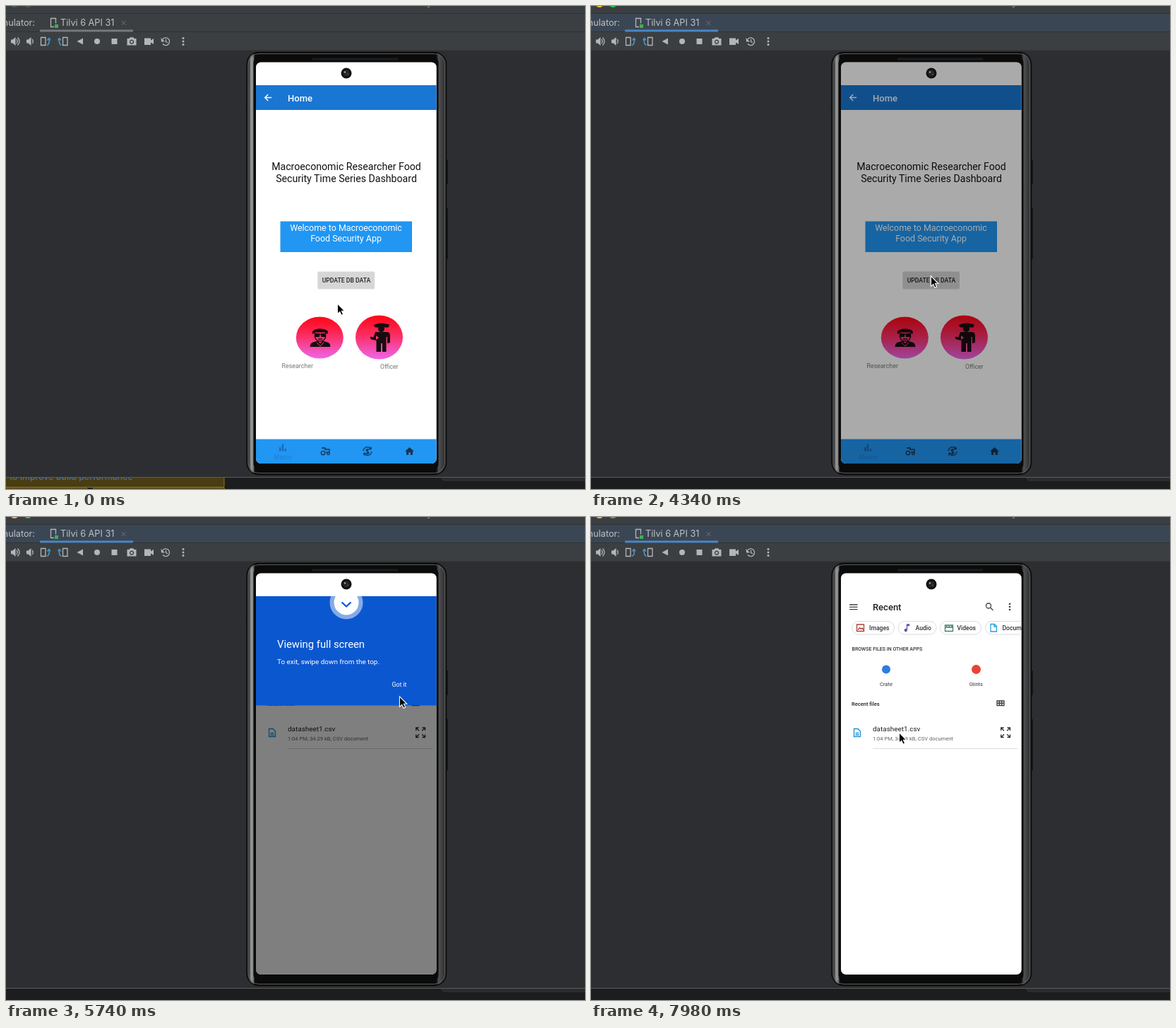
An HTML page for the animation above (8000 ms loop, 820x683 px).

```html
<!DOCTYPE html>
<html lang="en">
<head>
<meta charset="utf-8">
<title>Emulator</title>
<style>
html, body { margin: 0; width: 100%; height: 100%; overflow: hidden; background: #2d2e31; }
svg { display: block; width: 100vw; height: 100vh; }
text { font-family: Roboto, sans-serif; }
.ide text { font-family: Inter, sans-serif; font-size: 12.7px; fill: #bfc1c3; }
.m { font-weight: 500; }
.mid { text-anchor: middle; }
.line { fill: none; stroke: currentColor; stroke-width: 1.3; }
</style>
</head>
<body>
<svg viewBox="0 0 820 683">
<defs>
  <linearGradient id="pink" x2="0" y2="1">
    <stop offset=".05" stop-color="#ff0a1c"/><stop offset=".45" stop-color="#fb2d62"/><stop offset="1" stop-color="#ee66ea"/>
  </linearGradient>
  <linearGradient id="metal">
    <stop stop-color="#232425"/><stop offset=".012" stop-color="#3a3b3c"/><stop offset=".022" stop-color="#9a9b9b"/>
    <stop offset=".032" stop-color="#808181"/><stop offset=".04" stop-color="#0c0c0c"/><stop offset=".95" stop-color="#0c0c0c"/>
    <stop offset=".962" stop-color="#505152"/><stop offset=".98" stop-color="#3b3c3d"/><stop offset="1" stop-color="#29292a"/>
  </linearGradient>
  <clipPath id="glass"><rect x="354" y="79.500" width="255.700" height="567.500" rx="7"/></clipPath>
  <clipPath id="below"><rect x="354" y="112" width="256" height="535"/></clipPath>
</defs>

<!-- IDE window -->
<g class="ide">
  <path fill="#3c3f41" d="M0 0h820v63H0z"/>
  <path id="strip" d="M0 11h820v25H0z"/>
  <path fill="#2f3133" d="M0 10h820v1H0zM0 36h820v1H0zM0 62.500h820v1H0z"/>
  <circle id="light1" cx="12" cy="-3.500" r="5.500"/><circle id="light2" cx="31" cy="-3.500" r="5.500"/>
  <path d="M600 0l-1 1.500h-2" stroke="#999" fill="none"/>
  <text x="41" y="28" text-anchor="end">Emulator:</text>
  <text x="77" y="28">Tilvi 6 API 31</text>
  <path id="underline" d="M48 33.500h132v3H48z"/>
  <path d="M163.500 21l6 6m0-6l-6 6" stroke="#6f7274"/>
  <g color="#b3b6b8">
    <path class="line" d="M68 29.500h-4.500v-12h7v7"/>
    <path fill="#3fae55" d="M69 26h5v5h-5z"/>
    <g fill="#b3b6b8">
      <path d="M7 47.500h2.500l4-3.500v12l-4-3.500H7zM29 47.500h2.500l4-3.500v12l-4-3.500H29z"/>
      <path d="M109 45.500v9l-8.500-4.500z"/><circle cx="129" cy="50" r="4"/><path d="M149.500 46h8v8h-8z"/>
      <path fill-rule="evenodd" d="M171.500 46h3l1.200-1.700h4.600L181.500 46h3v9.500h-13zm6.500 1.500a3.200 3.200 0 1 0 .1 0z"/>
      <circle cx="178" cy="50.700" r="1.800"/>
      <path d="M196 45.500h9v3l4-2.500v8l-4-2.500v3.500h-9z"/>
      <path d="M219.500 45l.5 5.500h5z"/>
      <circle cx="251" cy="45.500" r="1.500"/><circle cx="251" cy="50" r="1.500"/><circle cx="251" cy="54.500" r="1.500"/>
    </g>
    <path class="line" d="M15 47q2.500 3 0 6m1.500-8.500q5 5.500 0 11M37 47q2.500 3 0 6M49.500 44.500h6.500v11h-6.500zM80.500 44.500h6.500v11h-6.500zM222 47a5.300 5.300 0 1 1 0 6.500m4.500-6.500v3.500l2.500 1.500"/>
    <path class="line" style="color:#4aa3df" d="M58 55.500q4-1.500 3-8m-2.500 1l2.500-3 2 3M78.500 55.500q-4-1.500-3-8m-2 1l2-3 2.500 3"/>
  </g>
  <path fill="#1c1d1e" d="M0 667h820v16H0z"/><path fill="#2b2c2d" d="M616 667h204v5H622q-5 0-6-5z"/>
  <path fill="#5b5d5f" d="M0 666h820v1H0z"/>
</g>
<svg id="balloon" y="667" width="820" height="16" viewBox="0 667 820 16">
  <path fill="#493d13" stroke="#8f7726" d="M-2 660h311v20.500H-2z"/>
  <path fill="#2b2921" stroke="#8f7726" d="M-2 682h117v8H-2zM123.500 682h186v8h-186z"/>
  <text x="5" y="670" font-size="12.500" style="font-family:Inter,sans-serif" fill="#4b78b8">to improve build performance</text>
</svg>

<!-- phone body -->
<path fill="#161717" d="M622 217h4v35h-4zM622 286h4v72h-4zM340 141h3v6h-3z"/>
<rect x="341" y="65.500" width="282.500" height="597" rx="17" fill="url(#metal)" stroke="#0b0b0b" stroke-width="1.500"/>
<rect x="343" y="67.500" width="278.500" height="593" rx="15" fill="none" stroke="#5b5c5d"/>
<rect x="350.500" y="70" width="262" height="587.500" rx="11" fill="#0b0b0b"/>
<path fill="#1c1d1e" d="M434 73.500h121v3H434z"/>

<g clip-path="url(#glass)">
  <path fill="#fff" d="M350 70h270v590H350z"/>

  <g id="home">
    <path fill="#1976d2" d="M354 112h256v35H354z"/>
    <path d="M376 129.500h-9m4.200-4.500l-4.500 4.500 4.500 4.500" fill="none" stroke="#fff" stroke-width="1.400"/>
    <text class="m" x="399" y="134.500" font-size="13" fill="#fff">Home</text>
    <g class="mid" font-size="14.130" fill="#111">
      <text x="482" y="232">Macroeconomic Researcher Food</text><text x="482" y="248.500">Security Time Series Dashboard</text>
    </g>
    <path fill="#2196f3" d="M388.500 304.500H575V348H388.500z"/>
    <g class="mid" font-size="12.440" fill="#fff">
      <text x="481.500" y="318">Welcome to Macroeconomic</text><text x="481.500" y="332.500">Food Security App</text>
    </g>
    <rect x="441.500" y="376.500" width="80.500" height="24" rx="1.500" fill="#0002"/>
    <rect id="button" x="441.500" y="375.500" width="80.500" height="24" rx="1.500"/>
    <text class="m mid" x="482" y="390.500" font-size="8.650" fill="#222">UPDATE DB DATA</text>

    <ellipse cx="444.300" cy="469" rx="33.500" ry="29.500" fill="url(#pink)"/>
    <ellipse cx="528.500" cy="468.500" rx="33.500" ry="31" fill="url(#pink)"/>
    <g fill="#190c10">
      <path d="M434.500 464q-2-4 2-6 8-3.500 17 0 4 2 1.500 6l-3-2.500h-14.500zM430.500 482q0-6 6-7l5-1.500 3.500 3.500 3.500-3.500 5 1.500q6 1 6 7z"/>
      <path d="M437 463h7v5h-7zM446 463h7v5h-7z"/>
      <path fill="none" stroke="#190c10" stroke-width="1.300" d="M437.500 461v7q1.500 6 7.500 6t7.500-6v-7M444 464.500h2M442 471h6"/>
      <path fill="none" stroke="#e84878" d="M440 476l5 5 5-5"/>
      <path d="M521 451q5-3 13-2.500l9 2-1.500 4H524q-3-1-3-3.500z"/>
      <circle cx="531.500" cy="456.500" r="4.500"/>
      <path d="M523 461h16q5 0 5 5v10l-4 1v-9h-1.500v21h-5.500v-12h-2v12h-6.500v-16l-7-1.500q-3-2-1-4l4 1z"/>
    </g>
    <path fill="#ef456f" d="M524 466l4 3-4 3z"/>
    <g fill="#777"><text x="390.500" y="512" font-size="8.870">Researcher</text><text x="530" y="513" font-size="8.700">Officer</text></g>

    <path fill="#2196f3" d="M354 612.500h256V648H354z"/>
    <path fill="#1b6bb5" d="M387 624h2.500v5.500H387zM390.700 619.500h2.500v10h-2.500zM394.500 626h2.500v3.500h-2.500z"/>
    <text class="mid" x="392" y="641" font-size="9" fill="#1c7fd4">Macro</text>
    <g color="#17344f">
      <path class="line" d="M451 627h7v4h-5M452 627v-2h-5"/>
      <circle class="line" cx="449" cy="632" r="2.700"/><circle class="line" cx="456.500" cy="633" r="1.700"/>
      <path class="line" d="M506 629a6 6 0 0 1 11-2.500m0-3v3h-3M518 630a6 6 0 0 1-11 2.500m0 3v-3h3"/>
      <path class="line" d="M514 627.500q-2-1-3.500 0t1.500 2.500 1.500 2.500-3.500 0m2-6.500v8"/>
      <path fill="#17344f" d="M571.500 624l6.300 5.700h-1.800v5h-3.300v-3.500h-2.500v3.500h-3.200v-5H565z"/>
    </g>
  </g>

  <g id="files">
    <g color="#3c4043">
      <path class="line" d="M366 124h11.500M366 127.300h11.500M366 130.600h11.500"/>
      <circle class="line" cx="563" cy="125.500" r="3.500"/><path class="line" d="M565.500 128l4 4"/>
      <g fill="#3c4043"><circle cx="593" cy="123" r="1.300"/><circle cx="593" cy="127" r="1.300"/><circle cx="593" cy="131" r="1.300"/></g>
    </g>
    <text class="m" x="399" y="131.700" font-size="13" fill="#202124">Recent</text>
    <g fill="none" stroke="#dadce0">
      <rect x="369.500" y="147.500" width="60" height="18.500" rx="9.200"/><rect x="435" y="147.500" width="54" height="18.500" rx="9.200"/>
      <rect x="494.500" y="147.500" width="58" height="18.500" rx="9.200"/><rect x="558.500" y="147.500" width="80" height="18.500" rx="9.200"/>
      <path d="M399 327.500h205"/>
    </g>
    <g class="m" font-size="8.600" fill="#303336">
      <text x="394" y="159.700">Images</text><text x="459.500" y="159.700">Audio</text>
      <text x="518.500" y="159.700">Videos</text><text x="582.500" y="159.700">Documents</text>
    </g>
    <path class="line" color="#b3403a" d="M376.500 152h10v9.500h-10zm1.500 7.500l2.500-3 2 2 1.500-1.500 2 2.500"/>
    <path class="line" color="#6b4fae" d="M447.500 159.500V152h3v1.500h-3"/><circle cx="445.800" cy="160" r="2.200" fill="#6b4fae"/>
    <path class="line" color="#45806a" d="M501.500 153h11v8.500h-11zm0 3h11m-9.500-3l1.500 3m2-3l1.500 3m2-3l1.500 3"/>
    <path class="line" color="#27a0dc" d="M566 151.500h5.500l3 3v7.500H566zm5 0v3.500h3.500"/>
    <text class="m" x="369.500" y="189" font-size="7" fill="#303336">BROWSE FILES IN OTHER APPS</text>
    <circle cx="418" cy="215.500" r="6" fill="#2f7de1"/><circle cx="545.500" cy="215.500" r="6.500" fill="#ea4335"/>
    <g class="mid" font-size="7.500" fill="#303336"><text x="418" y="239">Crate</text><text x="545.300" y="239">Glints</text></g>
    <text class="m" x="369" y="266.600" font-size="7.550" fill="#202124">Recent files</text>
    <path class="line" color="#3c4043" d="M575 260h10v6.500h-10zm0 3.250h10m-6.700-3.250v6.500m3.400-6.500v6.500"/>
    <path class="line" color="#1c93d6" d="M372.500 299.500h5.500l3.500 3.500v7.500h-9zm2 6h5m-5 2.500h5"/>
    <text x="399" y="302.500" font-size="9.950" fill="#202124">datasheet1.csv</text>
    <text x="399" y="315.700" font-size="7.560" fill="#5f6368">1:04 PM, 34.29 kB, CSV document</text>
    <path class="line" color="#303336" d="M580.700 302v-4h4m-4 0l4.300 4.300M589.500 298h4v4m0-4l-4.300 4.300M580.700 307.500v4h4m-4 0l4.300-4.300M589.500 311.500h4v-4m0 4l-4.300-4.300"/>
  </g>

  <path id="dim" d="M354 112h256v536H354z"/>
  <path id="black" d="M350 70h270v590H350z"/>
  <g clip-path="url(#below)">
    <g id="panel">
      <path fill="#0b57d0" d="M354 50h256v216.500H354z"/>
      <circle cx="482" cy="121" r="23.500" fill="#85abe7"/><circle cx="482" cy="121" r="17.500" fill="#fff"/>
      <path d="M475.500 120.500l6.500 6 6.500-6" fill="none" stroke="#0b57d0" stroke-width="2.300"/>
      <g fill="#fff">
        <text x="384" y="185" font-size="14.800">Viewing full screen</text>
        <text x="384" y="207.500" font-size="9.900">To exit, swipe down from the top.</text>
        <text x="546.500" y="240" font-size="8.750">Got it</text>
      </g>
      <rect id="ripple" x="536" y="229" width="42" height="16" rx="3" fill="#fff"/>
    </g>
  </g>
</g>
<circle cx="482" cy="95" r="7.500" fill="#101112"/><circle cx="482" cy="95" r="4.500" fill="#232528"/>
<circle cx="480" cy="93.500" r="1.300" fill="#9a9da0"/><circle cx="484" cy="96.500" r=".8" fill="#6a6d70"/>

<path id="cursor" d="M.4 .8v14.500l3.300-3 2.300 5 2.600-1.100-2.200-4.900h4.300z" fill="#000" stroke="#fff" stroke-width="1.100"/>
</svg>

<script>
const LOOP = 8000, STEP = 70;
const $ = id => document.getElementById(id);
const set = (id, name, value) => $(id).setAttribute(name, value);
const clamp = v => Math.min(1, Math.max(0, v));
const ramp = (t, a, b) => clamp((t - a) / (b - a));
const ease = p => p * p * (3 - 2 * p);
const slowDown = p => 1 - (1 - p) ** 2;

// start, end, x, y
const moves = [
  [350, 980, 469, 387], [2100, 2310, 481, 387], [3500, 3710, 481, 381],
  [5250, 5600, 557, 253], [6020, 6160, 558, 237],
  [6930, 7490, 446, 307], [7560, 7630, 436, 304]
];

function cursorAt(t) {
  let x = 469, y = 420;
  for (const [a, b, nx, ny] of moves) {
    const p = ease(ramp(t, a, b));
    x += (nx - x) * p;
    y += (ny - y) * p;
  }
  return [x, y];
}

function draw(t) {
  const focused = t >= 560;
  set('strip', 'fill', focused ? '#3b4654' : '#3c3f41');
  set('underline', 'fill', focused ? '#4a88c7' : '#777b7f');
  set('light1', 'fill', focused ? '#f5bd2f' : '#555759');
  set('light2', 'fill', focused ? '#28c440' : '#555759');
  set('balloon', 'opacity', 1 - ramp(t, 560, 980));

  const pressed = ramp(t, 2100, 2310) * (1 - ramp(t, 2380, 3010));
  const grey = 214 - 18 * pressed;
  set('button', 'fill', `rgb(${grey},${grey},${grey})`);

  // the new window covers home, the panel drops in, then the list loads behind it
  const listed = t >= 5740;
  const gone = ramp(t, 6370, 6650) ** 2;
  const shown = slowDown(ramp(t, 4670, 4950)) * (1 - gone);
  set('home', 'opacity', listed ? 0 : 1);
  set('files', 'opacity', listed ? 1 : 0);
  set('black', 'opacity', listed ? 0 : ramp(t, 4270, 4480));
  set('dim', 'opacity', listed ? (1 - gone) / 2 : 0);
  set('panel', 'opacity', shown);
  set('panel', 'transform', `translate(0 ${-60 * (1 - shown)})`);
  set('ripple', 'opacity', .15 * ramp(t, 6020, 6160));
  set('cursor', 'transform', `translate(${cursorAt(t)})`);
}

function tick(now) {
  draw(Math.floor(now % LOOP / STEP) * STEP);
  requestAnimationFrame(tick);
}
draw(0);
requestAnimationFrame(tick);
</script>
</body>
</html>
```
